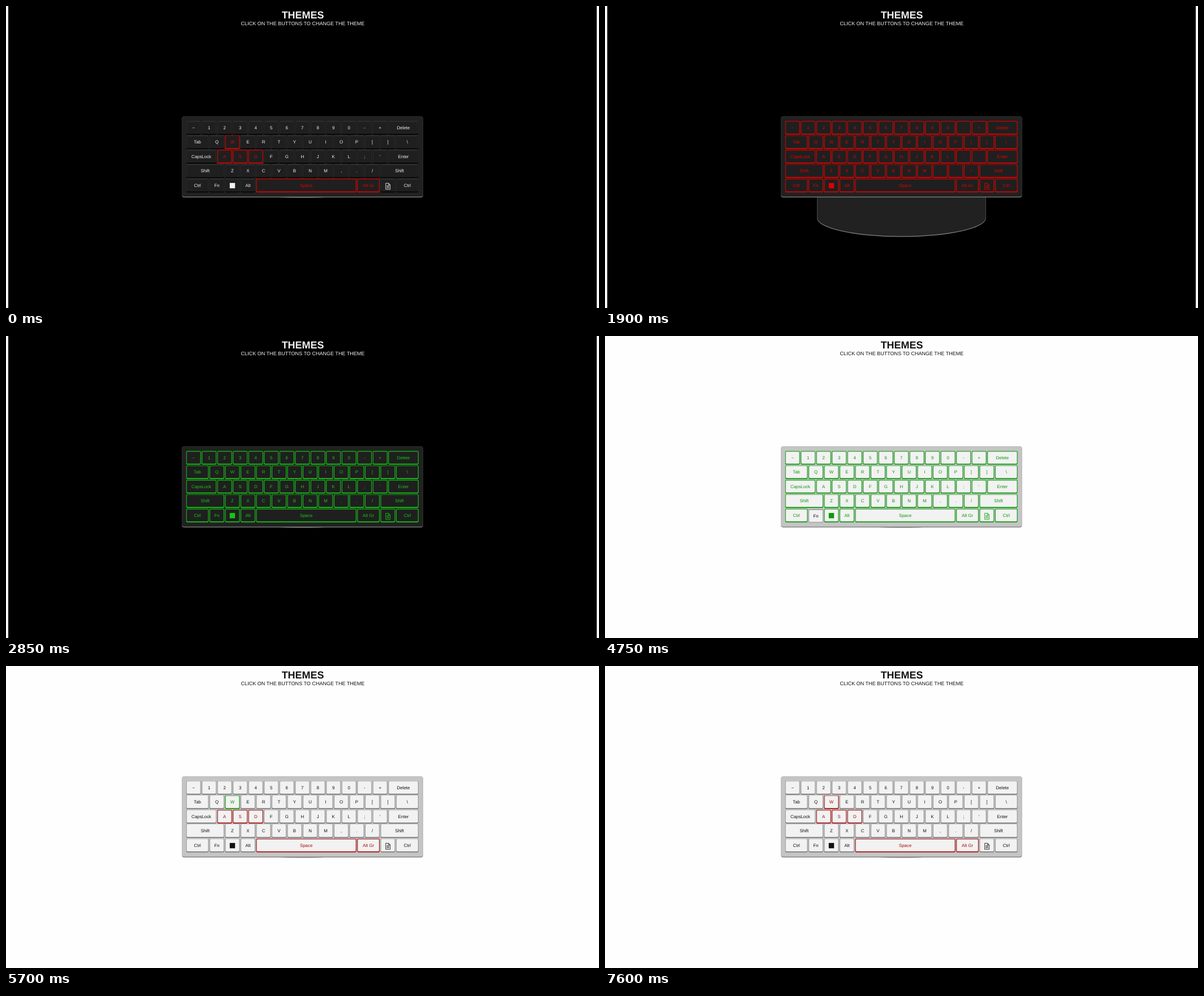
Recreate the animation shown at these times as an HTML page. Size 1049 px wide and 534 px high, loop 8000 ms.

```html
<!DOCTYPE html>
<html lang="en">
<head>
<meta charset="utf-8">
<title>Themes</title>
<style>
  html, body { margin: 0; width: 100%; height: 100%; overflow: hidden; background: #fff; }
  svg {
    display: block; width: 1049px; height: 534px;
    font-family: "Liberation Sans", Arial, sans-serif;
    text-rendering: geometricPrecision;
  }
  text { text-anchor: middle; fill: var(--ink); }

  .dark {
    --page: #000; --ink: #f2f2f2; --case: #212121; --rim: #727674;
    --face: #1f1f1f; --edge: #2e2e2e; --top: #3a3a3a; --foot: #000;
    --red: #e00000; --redtop: #980000; --green: #14c814; --greentop: #0c860c;
  }
  .light {
    --page: #fefefe; --ink: #111; --case: #c4c4c4; --rim: #858585;
    --face: #f2f2f2; --edge: #a0a0a0; --top: #fff; --foot: #777;
    --red: #a80c0c; --redtop: #d09090; --green: #0a9a0a; --greentop: #7cc47c;
  }

  .page { fill: var(--page); }
  .rim { fill: var(--rim); }
  .case { fill: var(--case); }
  .rest { transform: translateY(-69px); }
  .open .rest { transform: none; }

  .key { --label: var(--ink); font-size: 7.9px; }
  .key text, .key .mark { fill: var(--label); }
  .key .icon { fill: none; stroke: var(--label); stroke-width: .85; }
  .foot { fill: var(--foot); }
  .edge { fill: var(--edge); }
  .face { fill: var(--face); }
  .top { stroke: var(--top); stroke-width: .9; }

  .game, .allred .key {
    --label: var(--red); --edge: var(--red); --foot: var(--red); --top: var(--redtop);
  }
  .allgreen .key, .wgreen .w {
    --label: var(--green); --edge: var(--green); --foot: var(--green); --top: var(--greentop);
  }
  .press .fn {
    --label: #111; --edge: #a0a0a0; --foot: #777; --top: #a0a0a0;
    transform: translateY(1px);
  }
  .press .fn .foot { height: 22.9px; }
</style>
</head>
<body>
<svg id="stage" class="dark" viewBox="0 0 1049 534">
  <rect class="page" x="4" width="1041" height="534"/>
  <text x="525" y="22" font-size="17.95" font-weight="700">THEMES</text>
  <text x="525" y="34.2" font-size="9.04">CLICK ON THE BUTTONS TO CHANGE THE THEME</text>
  <g class="rest">
    <path class="rim" d="M375 330V375A149.5 33.3 0 0 0 674 375V330Z"/>
    <path class="case" d="M375.5 330V374A149 32.8 0 0 0 673.5 374V330Z"/>
  </g>
  <rect class="rim" x="311.3" y="195.3" width="426.4" height="143.2" rx="4"/>
  <rect class="case" x="311.3" y="195.3" width="426.4" height="141.7" rx="4"/>
  <g id="keys"></g>
</svg>
<script>
  const UNIT = 27.5, PITCH = 25.5, LEFT = 318.9, TOP = 203.6, HEIGHT = 23.9;

  // A key is "label" or "label:units"
  const rows = [
    "~ 1 2 3 4 5 6 7 8 9 0 - + Delete:2",
    "Tab:1.5 Q W E R T Y U I O P [ ] \\:1.5",
    "CapsLock:2 A S D F G H J K L ; ' Enter:2",
    "Shift:2.5 Z X C V B N M , . / Shift:2.5",
    "Ctrl:1.5 Fn #mark Alt Space:6.5 Alt_Gr:1.5 #doc Ctrl:1.5"
  ];
  const game = ["W", "A", "S", "D", "Space", "Alt_Gr"];

  const rect = (cls, x, y, w, h, r) =>
    `<rect class="${cls}" x="${x}" y="${y}" width="${w}" height="${h}" rx="${r}"/>`;

  function legend(name, cx, y) {
    if (name === "#mark") return rect("mark", cx - 4.7, y + 7.3, 9.4, 9.4, 0);
    if (name === "#doc") {
      return `<path class="icon" transform="translate(${cx - 4.2} ${y + 7.4})"
        d="M.4 .4H5.5L8.3 3.2V11.2H.4ZM5.5 .4V3.2H8.3M2 4.6H6.7M2 6.6H6.7M2 8.6H6.7"/>`;
    }
    return `<text x="${cx}" y="${y + 14.2}">${name.replace("_", " ")}</text>`;
  }

  function key(name, x, y, w) {
    const cls = ["key"];
    if (game.includes(name)) cls.push("game");
    if (name === "W" || name === "Fn") cls.push(name.toLowerCase());
    return `<g class="${cls.join(" ")}">` +
      rect("foot", x, y, w, HEIGHT, 2) +
      rect("edge", x, y, w, HEIGHT - 1.4, 2) +
      rect("face", x + .9, y + .8, w - 1.8, HEIGHT - 2.6, 1.4) +
      `<path class="top" d="M${x + 1.4} ${y + .45}H${x + w - 1.4}"/>` +
      legend(name, x + w / 2, y) + "</g>";
  }

  document.getElementById("keys").innerHTML = rows.map((row, r) => {
    let x = LEFT;
    return row.split(" ").map(item => {
      const [name, units = 1] = item.split(":");
      const out = key(name, x, TOP + r * PITCH, units * UNIT - 1.8);
      x += units * UNIT;
      return out;
    }).join("");
  }).join("");

  const LOOP = 8000, STEP = 950;
  const looks = [
    "dark",
    "dark allred",
    "dark allred open",
    "dark allgreen",
    "dark wgreen",
    "light allgreen press",
    "light wgreen",
    "dark wgreen",
    "light"
  ];
  const stage = document.getElementById("stage");
  const start = performance.now();

  function draw() {
    const t = (performance.now() - start) % LOOP;
    const look = looks[Math.floor(t / STEP)];
    if (stage.getAttribute("class") !== look) stage.setAttribute("class", look);
    requestAnimationFrame(draw);
  }
  draw();
</script>
</body>
</html>
```
